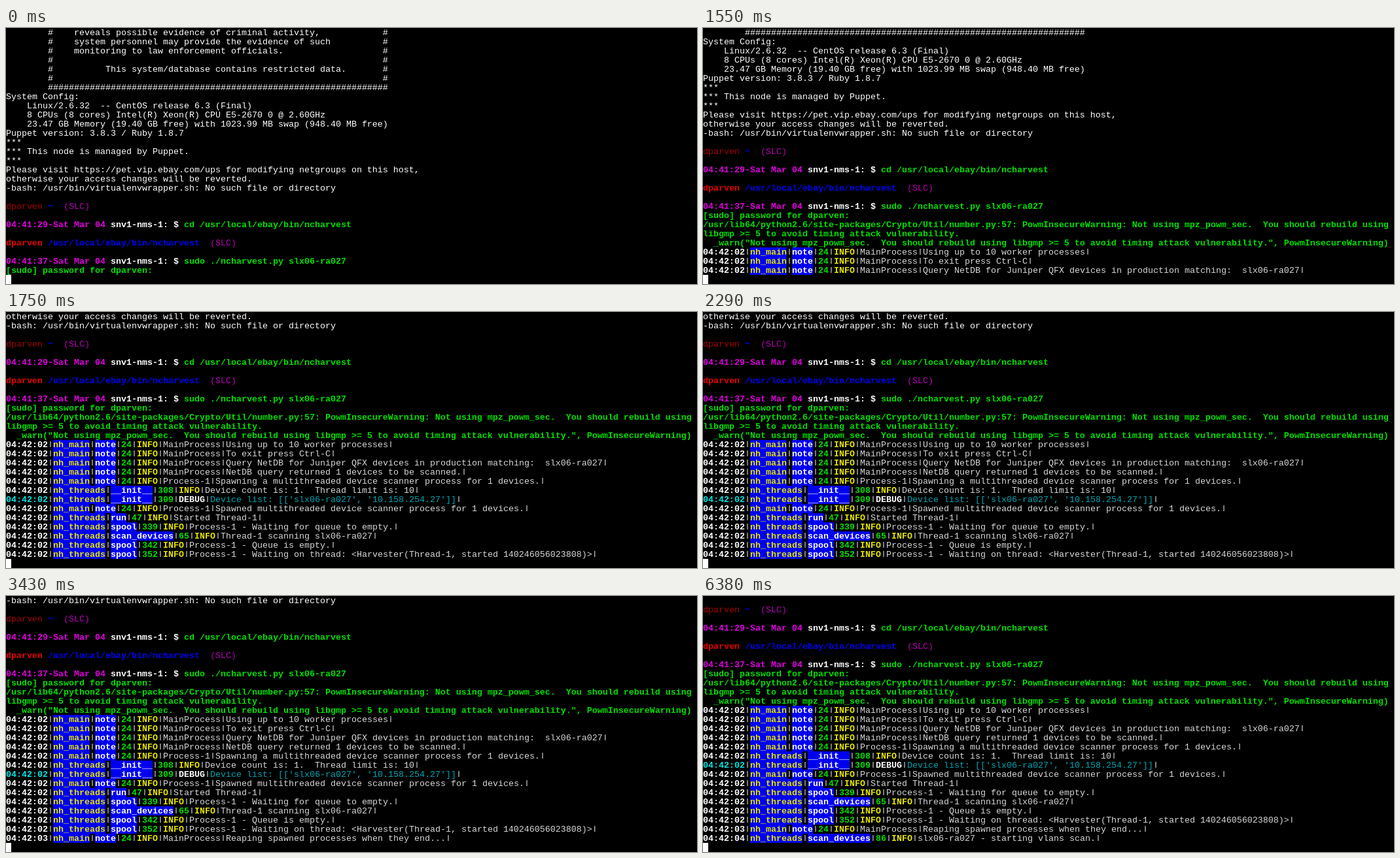
An HTML page that plays this animation: 1056x392 px, repeating every 8000 ms.

```html
<!DOCTYPE html>
<html lang="en">
<head>
<meta charset="utf-8">
<title>Terminal session</title>
<style>
  html, body { margin: 0; width: 100%; height: 100%; overflow: hidden; background: #000; }
  #view { position: absolute; left: 0; top: 0; width: 1056px; height: 378px; overflow: hidden; }
  #log { font: 13.33px/15px "Liberation Mono", monospace; font-variant-ligatures: none; color: #fff; }
  #log div { height: 14px; white-space: pre; }
  #log span { display: inline-block; height: 14px; vertical-align: top; }
  #log .bar { color: #e5e5e5; clip-path: inset(2px 0 3px); }
  #cursor { position: absolute; left: 0; top: 378px; width: 8px; height: 14px; background: #fff; }
  .w, .g, .m, .r, .b, .y, .c, .mod, .fn { font-weight: bold; }
  .g { color: #00e000; }
  .m { color: #e000e0; }
  .r { color: #e50000; }
  .b { color: #0000f0; }
  .y { color: #e5e500; }
  .c { color: #00e5e5; }
  .mod { color: #e5e500; background: #0000f0; }
  .fn { color: #fff; background: #0000f0; }
  .red { color: #a80000; }
  .mag { color: #b800b8; }
  .cyan { color: #00a6b2; }
  .msg { color: #d8d8d8; }
</style>
</head>
<body>
<div id="view"><div id="log"></div></div>
<div id="cursor"></div>
<script>
const ROW = 14, LOOP = 8000;
const USER = 'dparven', HOST = 'slx06-ra027';

// A line is a list of [class, text] parts.
const plain = text => [['', text]];
const green = text => [['g', text]];
const boxed = text => plain(' '.repeat(8) + ('#    ' + text).padEnd(64) + '#');
const where = (cls, path) => [[cls, USER], ['', ' '], ['b', path], ['', '  '], ['mag', '(SLC)']];
const prompt = (time, cmd) => [
  ['m', time + '-Sat Mar 04'], ['w', ' snv1-nms-1: $ '], ['g', cmd]
];

// Log fields are each followed by a short bar.
function entry(sec, mod, fn, num, text, level = 'INFO') {
  const debug = level === 'DEBUG';
  const fields = [
    [debug ? 'c' : 'w', '04:42:0' + sec], ['mod', mod], ['fn', fn],
    ['g', String(num)], [debug ? 'w' : 'y', level],
    ...text.split('|').map(part => [debug ? 'cyan' : 'msg', part])
  ];
  return fields.flatMap(field => [field, ['bar', '|']]);
}
const main = (text, sec = 2) => entry(sec, 'nh_main', 'note', 24, text);
const thread = (fn, num, text, sec = 2, level) => entry(sec, 'nh_threads', fn, num, text, level);

const lines = [
  boxed('reveals possible evidence of criminal activity,'),
  boxed('system personnel may provide the evidence of such'),
  boxed('monitoring to law enforcement officials.'),
  boxed(''),
  boxed('      This system/database contains restricted data.'),
  boxed(''),
  plain(' '.repeat(8) + '#'.repeat(65)),
  plain('System Config:'),
  plain('    Linux/2.6.32  -- CentOS release 6.3 (Final)'),
  plain('    8 CPUs (8 cores) Intel(R) Xeon(R) CPU E5-2670 0 @ 2.60GHz'),
  plain('    23.47 GB Memory (19.40 GB free) with 1023.99 MB swap (948.40 MB free)'),
  plain('Puppet version: 3.8.3 / Ruby 1.8.7'),
  plain('***'),
  plain('*** This node is managed by Puppet.'),
  plain('***'),
  plain('Please visit https://pet.vip.ebay.com/ups for modifying netgroups on this host,'),
  plain('otherwise your access changes will be reverted.'),
  plain('-bash: /usr/bin/virtualenvwrapper.sh: No such file or directory'),
  [],
  where('red', '~'),
  [],
  prompt('04:41:29', 'cd /usr/local/ebay/bin/ncharvest'),
  [],
  where('r', '/usr/local/ebay/bin/ncharvest'),
  [],
  prompt('04:41:37', 'sudo ./ncharvest.py ' + HOST),
  green(`[sudo] password for ${USER}:`),

  green('/usr/lib64/python2.6/site-packages/Crypto/Util/number.py:57: PowmInsecureWarning: ' +
    'Not using mpz_powm_sec.  You should rebuild using'),
  green('libgmp >= 5 to avoid timing attack vulnerability.'),
  green('  _warn("Not using mpz_powm_sec.  You should rebuild using libgmp >= 5 ' +
    'to avoid timing attack vulnerability.", PowmInsecureWarning)'),

  main('MainProcess|Using up to 10 worker processes'),
  main('MainProcess|To exit press Ctrl-C'),
  main('MainProcess|Query NetDB for Juniper QFX devices in production matching:  ' + HOST),

  main('MainProcess|NetDB query returned 1 devices to be scanned.'),
  main('Process-1|Spawning a multithreaded device scanner process for 1 devices.'),
  thread('__init__', 308, 'Device count is: 1.  Thread limit is: 10'),
  thread('__init__', 309, `Device list: [['${HOST}', '10.158.254.27']]`, 2, 'DEBUG'),
  main('Process-1|Spawned multithreaded device scanner process for 1 devices.'),

  thread('run', 47, 'Started Thread-1'),
  thread('spool', 339, 'Process-1 - Waiting for queue to empty.'),
  thread('scan_devices', 65, 'Thread-1 scanning ' + HOST),
  thread('spool', 342, 'Process-1 - Queue is empty.'),
  thread('spool', 352, 'Process-1 - Waiting on thread: <Harvester(Thread-1, started 140246056023808)>'),

  main('MainProcess|Reaping spawned processes when they end...', 3),
  thread('scan_devices', 86, HOST + ' - starting vlans scan.', 4)
];

const log = document.getElementById('log');
for (const parts of lines) {
  const row = document.createElement('div');
  for (const [cls, text] of parts) {
    const span = document.createElement('span');
    span.className = cls;
    span.textContent = text;
    row.append(span);
  }
  log.append(row);
}

// [time in ms, rows scrolled off the top]
const scroll = [[0, 0], [850, 3], [1550, 6], [1650, 11], [1750, 16], [2650, 17], [3950, 18], [LOOP, 18]];
log.animate(
  scroll.map(([t, rows]) => ({
    offset: t / LOOP,
    transform: `translateY(${-rows * ROW}px)`,
    easing: 'step-end'
  })),
  { duration: LOOP, iterations: Infinity }
);
</script>
</body>
</html>
```
